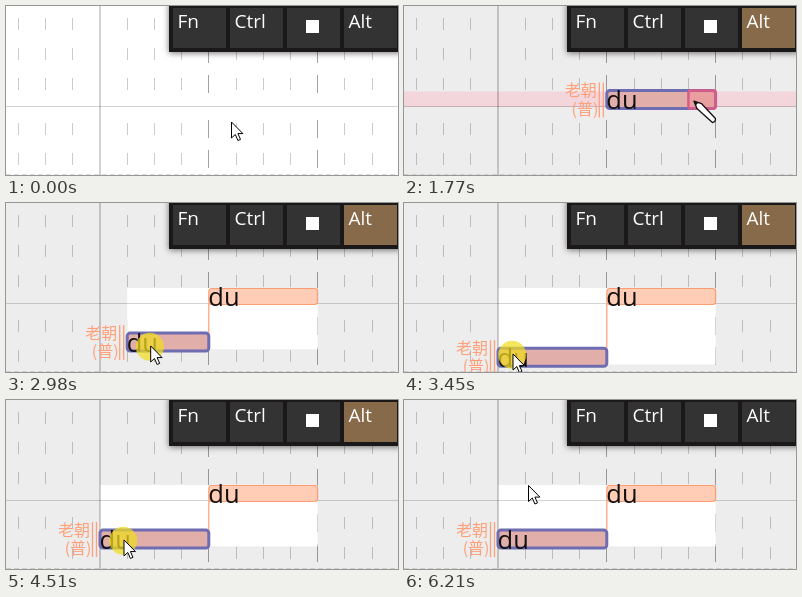
Recreate the animation shown at these times as an HTML page. Size 392 by 169 pixels, loop 6.28 s.

```html
<!DOCTYPE html>
<html lang="en">
<head>
<meta charset="utf-8">
<title>Piano roll</title>
<style>
html, body { margin: 0; width: 100%; height: 100%; overflow: hidden; background: #fff; }
svg { display: block; width: 100vw; height: 100vh; }
.key { font: 19px "Open Sans", "Noto Sans", sans-serif; fill: #fff; }
.lyric { font: 25.5px "Open Sans", "Noto Sans", sans-serif; fill: #111; }
.singer { font: 16px "Noto Sans CJK SC", "Noto Sans CJK", sans-serif; fill: #ffa07a; text-anchor: end; }
.panel { filter: drop-shadow(0 1px 3px rgba(0, 0, 0, .55)); }
</style>
</head>
<body>
<svg id="stage" viewBox="0 0 392 169" preserveAspectRatio="none"></svg>
<script>
const NS = 'http://www.w3.org/2000/svg';
const LOOP = 6280, STEP = 200 / 3, OFFSET = 33;
const X0 = 94, CELL = 27.2, Y0 = 85.5, ROW = 15.2;

// Pointer tip: time, x, y
const PATH = [
  [0, 225.5, 116], [170, 225.5, 116], [233, 225.5, 110.5], [370, 225.5, 110.5],
  [700, 213.5, 106.5], [833, 213.5, 106.5], [1033, 262, 88], [1367, 290, 94.5],
  [1766, 290, 95], [2100, 208, 130], [2170, 208, 130], [2367, 199, 128],
  [2633, 199, 128], [3167, 112, 152], [3433, 109, 151], [3767, 88, 117],
  [3910, 88, 117], [4100, 117, 117], [4310, 117, 117], [4500, 118, 140],
  [5466, 118, 140], [6133, 124.5, 87], [6200, 124.5, 84]
];
const T = { alt: [440, 5300], first: 770, drop: 1700, second: 2700, release: 4910 };

function add(parent, tag, attrs = {}, text) {
  const el = document.createElementNS(NS, tag);
  set(el, attrs);
  if (text) el.textContent = text;
  return parent.appendChild(el);
}
function set(el, attrs) {
  for (const k in attrs) el.setAttribute(k, attrs[k]);
}
function show(el, on) {
  el.style.display = on ? '' : 'none';
}
const between = (t, a, b) => t >= a && t < b;
const rowTop = y => Y0 + Math.floor((y - Y0) / ROW) * ROW;
const cellLeft = x => X0 + Math.floor((x - X0) / CELL) * CELL;

const stage = document.getElementById('stage');
const paper = add(stage, 'rect', { width: 392, height: 169 });

const ticks = add(stage, 'g', { stroke: '#000' });
for (let i = -3; i < 11; i++) {
  if (!i) continue;
  const beat = i % 4 === 0, half = beat ? 9 : 6;
  const x = Math.floor(X0 + i * CELL) + .5;
  for (const y of [18, 48, 78, 123, 153])
    add(ticks, 'path', { d: `M${x} ${y - half}V${y + half}`, opacity: beat ? .36 : .2 });
}
const phrase = add(stage, 'rect', { y: 85, fill: '#fff' });
const band = add(stage, 'rect', { width: 392, height: ROW + .4 });
add(stage, 'path', { d: 'M0 100.5H392', stroke: '#000', opacity: .17 });
add(stage, 'path', { d: 'M0 168.5H392', stroke: '#000', opacity: .13, 'stroke-dasharray': '5 3' });
add(stage, 'path', { d: 'M94 0V169', stroke: '#000', opacity: .36 });

const link = add(stage, 'path', { stroke: '#ff9d72', 'stroke-width': 1.2 });

function makeNote() {
  const g = add(stage, 'g');
  const box = add(g, 'rect', { rx: 3 });
  const tag = add(g, 'g');
  add(tag, 'text', { class: 'singer', x: -10, y: 4.5 }, '老朝');
  add(tag, 'text', { class: 'singer', x: -8.5, y: 23 }, '(普)');
  add(tag, 'path', { d: 'M-7.5-9V26M-3.5-9V26', stroke: '#ffa07a', 'stroke-width': 1.3 });
  const lyric = add(g, 'text', { class: 'lyric' }, 'du');
  return { g, box, tag, lyric };
}
function placeNote(n, left, right, top, selected) {
  const grow = selected ? 1 : 0;
  set(n.box, {
    x: left, width: right - left, y: top - grow, height: ROW + .8 + 2 * grow,
    fill: selected ? '#e2aeaa' : '#ffccb5',
    stroke: selected ? '#6f6db1' : '#ff9d72',
    'stroke-width': selected ? 3 : 1.2
  });
  set(n.tag, { transform: `translate(${left} ${top})` });
  show(n.tag, selected);
  set(n.lyric, { x: left - .5, y: top + 17.5 });
}
const noteA = makeNote(), noteB = makeNote();
const hover = add(stage, 'rect', { width: CELL, height: 18, 'stroke-width': 2.5 });

const panel = add(stage, 'g', { class: 'panel' });
add(panel, 'rect', { x: 163, y: -4, width: 233, height: 50, fill: '#1b1819' });
const keys = ['Fn', 'Ctrl', '', 'Alt'].map((name, i) => {
  const x = 167 + i * 57;
  const key = add(panel, 'rect', { x, y: 2, width: 53, height: 40, fill: '#333' });
  if (name) add(panel, 'text', { class: 'key', x: x + 4.5, y: 21.5 }, name);
  else add(panel, 'rect', { x: x + 19, y: 14, width: 13, height: 13, fill: '#fff' });
  return key;
});

const glow = add(stage, 'circle', { r: 14, fill: '#f0dc1e', opacity: .72 });
const pointer = add(stage, 'g', { 'stroke-linejoin': 'round' });
const arrow = add(pointer, 'path', {
  d: 'M0 0V16L3.8 12.5L6.4 18.5L9 17.4L6.4 11.6H11.4Z',
  fill: '#fff', stroke: '#000'
});
const pen = add(pointer, 'g');
add(pen, 'path', {
  d: 'M0 0L7.5 2.5L21.5 17.5Q22 20.5 18.5 21.5L3 7.5Z',
  fill: '#fff', stroke: '#111', 'stroke-width': 1.3
});
add(pen, 'path', { d: 'M0 0L4.5 1.5L1.8 4.5Z', fill: '#111' });

function tipAt(t) {
  const q = Math.max(0, Math.floor((t - OFFSET) / STEP) * STEP + OFFSET);
  const i = PATH.findIndex(p => p[0] > q);
  if (i < 0) return PATH[PATH.length - 1].slice(1);
  const [t0, x0, y0] = PATH[i - 1], [t1, x1, y1] = PATH[i];
  const k = (q - t0) / (t1 - t0);
  return [x0 + (x1 - x0) * k, y0 + (y1 - y0) * k];
}

function draw(t) {
  const [x, y] = tipAt(t);
  const alt = between(t, ...T.alt);
  const drawing = between(t, T.alt[0], T.first) || between(t, T.drop, T.second);
  const pressed = between(t, T.first, T.drop) || between(t, T.second, T.release);
  const top = rowTop(y), left = cellLeft(x);
  const beatA = X0 + 4 * CELL, endA = X0 + 8 * CELL;

  set(paper, { fill: t < T.first ? '#fff' : '#ededed' });
  set(keys[3], { fill: alt ? '#866a49' : '#333' });

  show(noteA.g, t >= T.first);
  const growing = t < T.drop;
  const topA = growing ? top : Y0;
  placeNote(noteA, beatA, growing ? left + CELL : endA, topA, t < T.second);

  const two = t >= T.second;
  for (const el of [noteB.g, phrase, link]) show(el, two);
  if (two) {
    const [bx, by] = tipAt(Math.min(t, T.release));
    const topB = rowTop(by), leftB = cellLeft(bx);
    placeNote(noteB, leftB, beatA, topB, true);
    const edge = Math.max(X0, leftB);
    set(phrase, { x: edge, width: endA - edge, height: Math.max(topB + ROW, 146.3) - 85 });
    set(link, { d: `M${beatA} ${Y0 + ROW}V${topB}` });
  }

  const onNote = t >= T.drop && top < Y0 + 1 && x > beatA && x < endA;
  show(band, drawing);
  show(hover, drawing);
  set(band, { y: top, fill: onNote ? 'rgba(255,165,185,.33)' : 'rgba(255,190,150,.25)' });
  set(hover, {
    x: left, y: top - 1, rx: onNote ? 2 : 0,
    fill: onNote ? 'rgba(255,110,130,.25)' : 'none',
    stroke: onNote ? '#d95c88' : '#ff9d6e'
  });

  show(glow, pressed);
  set(glow, { cx: x - .8, cy: y + .8 });
  show(arrow, !drawing);
  show(pen, drawing);
  set(pointer, { transform: `translate(${x} ${y})` });
}

const start = performance.now();
function tick() {
  draw((performance.now() - start) % LOOP);
  requestAnimationFrame(tick);
}
tick();
</script>
</body>
</html>
```
